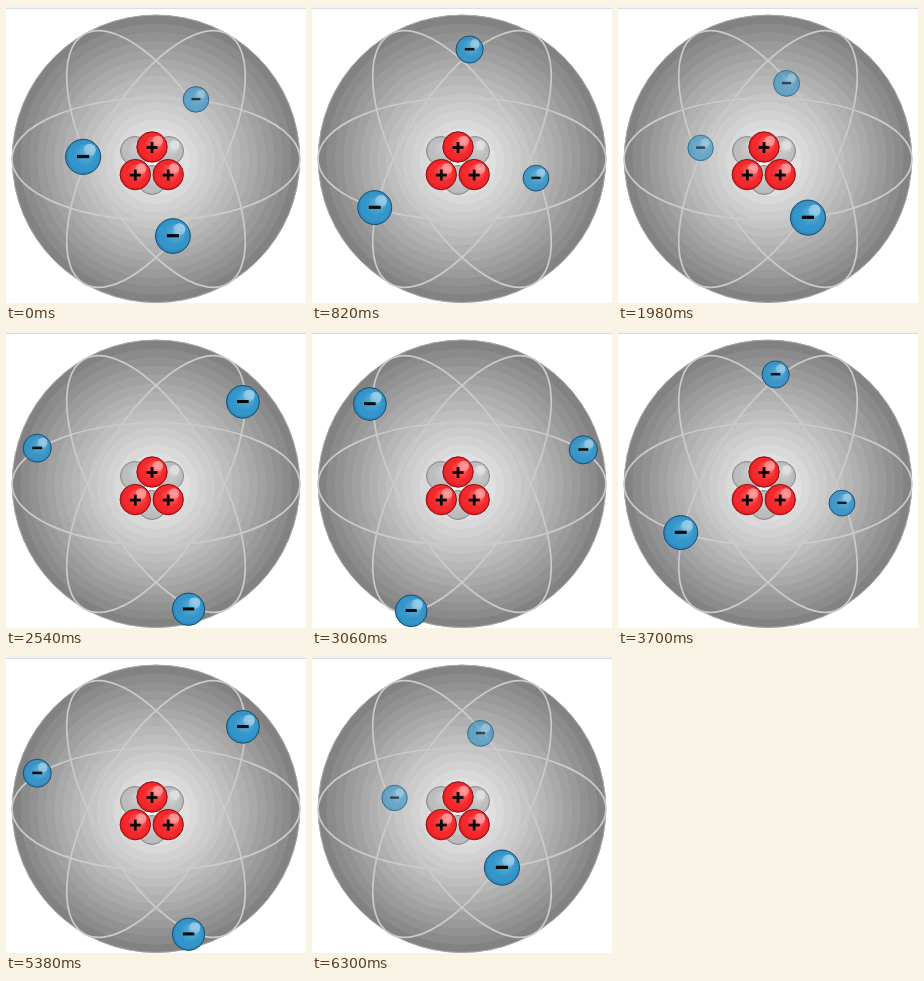
An HTML page with a canvas that plays this animation: 300 px wide and 297 px high, repeating every 6340 ms.

```html
<!DOCTYPE html>
<html lang="en">
<head>
<meta charset="utf-8">
<title>Atom</title>
<style>
html, body { margin: 0; width: 100%; height: 100%; overflow: hidden; background: #fff; }
canvas { display: block; width: 300px; height: 297px; }
</style>
</head>
<body>
<canvas id="stage" width="300" height="297"></canvas>
<script>
const ctx = document.getElementById('stage').getContext('2d');
const TAU = Math.PI * 2, RAD = Math.PI / 180;
const LOOP = 6340, POSES = 16;
const CX = 150, CY = 153.5, MAJOR = 145, MINOR = 61.5;

// Runs of even steps: first time, last time, first pose, last pose.
const RUNS = [
  [0, 0, 0, 0], [100, 640, 1, 7], [760, 820, 8, 9], [940, 1280, 10, 14],
  [1400, 1980, 15, 22], [2100, 2540, 23, 28], [2600, 2700, 29, 30],
  [2760, 3340, 31, 37], [3460, 3700, 38, 41], [3820, 4040, 42, 45],
  [4160, 4720, 46, 52], [4820, 4920, 53, 55], [5060, 5380, 56, 60],
  [5500, 5500, 61, 61], [5660, 5960, 63, 66], [6100, 6300, 67, 70]
];

// Each orbit: tilt, sideways shift of the path, angles reached at KEY_POSES.
const KEY_POSES = [0, 6, 9, 12, 16];
const ORBITS = [
  { tilt: 0, shift: -1, angles: [286, 434, 487, 575, 646] },
  { tilt: 60, shift: 2.5, angles: [105.5, 247, 291.5, 391, 465.5] },
  { tilt: -60, shift: -3.5, angles: [113.5, 260.6, 313.1, 397.5, 473.5] }
];

// Arc length along the ellipse, one entry per degree, for even travel speed.
const arc = [0];
for (let d = 0; d < 720; d++) {
  const a = (d + 0.5) * RAD;
  arc.push(arc[d] + Math.hypot(MAJOR * Math.sin(a), MINOR * Math.cos(a)) * RAD);
}
const mix = (a, b, k) => a + (b - a) * k;
const clamp = v => Math.max(0, Math.min(1, v));

function arcAt(deg) {
  const i = Math.floor(deg);
  return mix(arc[i], arc[i + 1], deg - i);
}

function angleAt(length) {
  const i = Math.max(1, arc.findIndex(v => v >= length));
  return i - 1 + (length - arc[i - 1]) / (arc[i] - arc[i - 1]);
}

function poseAt(time) {
  const [t0, t1, p0, p1] = RUNS.findLast(run => run[0] <= time);
  const k = t1 > t0 ? clamp((time - t0) / (t1 - t0)) : 0;
  return (p0 + Math.floor((p1 - p0) * k + 1e-6)) % POSES;
}

function electronAt(orbit, pose) {
  const i = KEY_POSES.findLastIndex(p => p <= pose);
  const k = (pose - KEY_POSES[i]) / (KEY_POSES[i + 1] - KEY_POSES[i]);
  const deg = angleAt(mix(arcAt(orbit.angles[i]), arcAt(orbit.angles[i + 1]), k));
  const u = MAJOR * Math.cos(deg * RAD), depth = Math.sin(deg * RAD);
  const v = MINOR * depth + orbit.shift;
  const c = Math.cos(orbit.tilt * RAD), s = Math.sin(orbit.tilt * RAD);
  const fromBack = Math.abs((deg % 360) - 264);
  return {
    x: CX + u * c - v * s,
    y: CY + u * s + v * c,
    r: 15.7 + 1.8 * depth + 0.7 * depth ** 3,
    alpha: mix(0.7, 1, clamp((fromBack - 20) / 8)) * (1 + 0.1 * Math.min(depth, 0)),
    depth
  };
}

function disc(x, y, r, fill) {
  ctx.beginPath();
  ctx.arc(x, y, r, 0, TAU);
  ctx.fillStyle = fill;
  ctx.fill();
}

function ball(x, y, r, [light, base, dark, edge]) {
  const shade = ctx.createRadialGradient(x + r * 0.3, y - r * 0.3, r * 0.1, x, y, r);
  shade.addColorStop(0, light);
  shade.addColorStop(0.6, base);
  shade.addColorStop(0.8, base);
  shade.addColorStop(1, dark);
  disc(x, y, r - 0.5, shade);
  ctx.strokeStyle = edge;
  ctx.lineWidth = 1;
  ctx.stroke();

  const hx = x + r * 0.36, hy = y - r * 0.38, hr = r * 0.34;
  const gloss = ctx.createLinearGradient(hx + hr, hy - hr, hx - hr, hy + hr);
  gloss.addColorStop(0, 'rgba(255,255,255,0.6)');
  gloss.addColorStop(1, 'rgba(255,255,255,0.1)');
  disc(hx, hy, hr, gloss);
}

function bar(x, y, w, h) {
  ctx.fillStyle = '#0a0a0a';
  ctx.fillRect(x - w / 2, y - h / 2, w, h);
}

const BLUE = ['#5fb1dc', '#3395c9', '#2582b8', '#1d4d6b'];
const RED = ['#ff6a6a', '#f5282c', '#d4161c', '#8c1215'];
const GREY = ['#d2d2d2', '#bdbdbd', '#adadad', '#8a8a8a'];

function drawShell() {
  ctx.fillStyle = '#fff';
  ctx.fillRect(0, 0, 300, 297);
  ctx.fillStyle = '#f1f1f1';
  ctx.fillRect(0, 0, 300, 3);
  ctx.fillStyle = '#dcdcdc';
  ctx.fillRect(0, 2, 300, 1);

  const bands = 17;
  for (let i = 0; i < bands; i++) {
    const k = i / (bands - 1);
    const tone = Math.round(mix(130, 244, k ** 0.93));
    disc(150, mix(152.8, 157, k), 144 * (1 - i / bands), `rgb(${tone},${tone},${tone})`);
  }
  ctx.lineWidth = 1;
  ctx.strokeStyle = '#a8a8a8';
  ctx.beginPath();
  ctx.arc(150, 152.8, 143.7, 0, TAU);
  ctx.stroke();

  ctx.strokeStyle = '#cacaca';
  ctx.lineWidth = 1.7;
  for (const { tilt } of ORBITS) {
    ctx.beginPath();
    ctx.ellipse(CX, CY - 0.5, 144, 61, tilt * RAD, 0, TAU);
    ctx.stroke();
  }
}

function drawNucleus() {
  for (const [x, y] of [[129, 145], [163, 145], [146, 174]]) ball(x, y, 15, GREY);
  for (const [x, y] of [[146, 141], [129.3, 168.6], [162.2, 168.6]]) {
    ball(x, y, 15.7, RED);
    bar(x, y + 0.5, 11, 2.8);
    bar(x, y + 0.5, 2.8, 11);
  }
}

function drawElectron({ x, y, r, alpha }) {
  ctx.globalAlpha = alpha;
  ball(x, y, r, BLUE);
  bar(x, y - 0.3, r * 0.68, r * 0.18);
  ctx.globalAlpha = 1;
}

function draw(now) {
  const pose = poseAt(now % LOOP);
  drawShell();
  drawNucleus();
  ORBITS.map(orbit => electronAt(orbit, pose))
    .sort((a, b) => a.depth - b.depth)
    .forEach(drawElectron);
}

let start;
function tick(now) {
  start ??= now;
  draw(now - start);
  requestAnimationFrame(tick);
}
draw(0);
requestAnimationFrame(tick);
</script>
</body>
</html>
```
